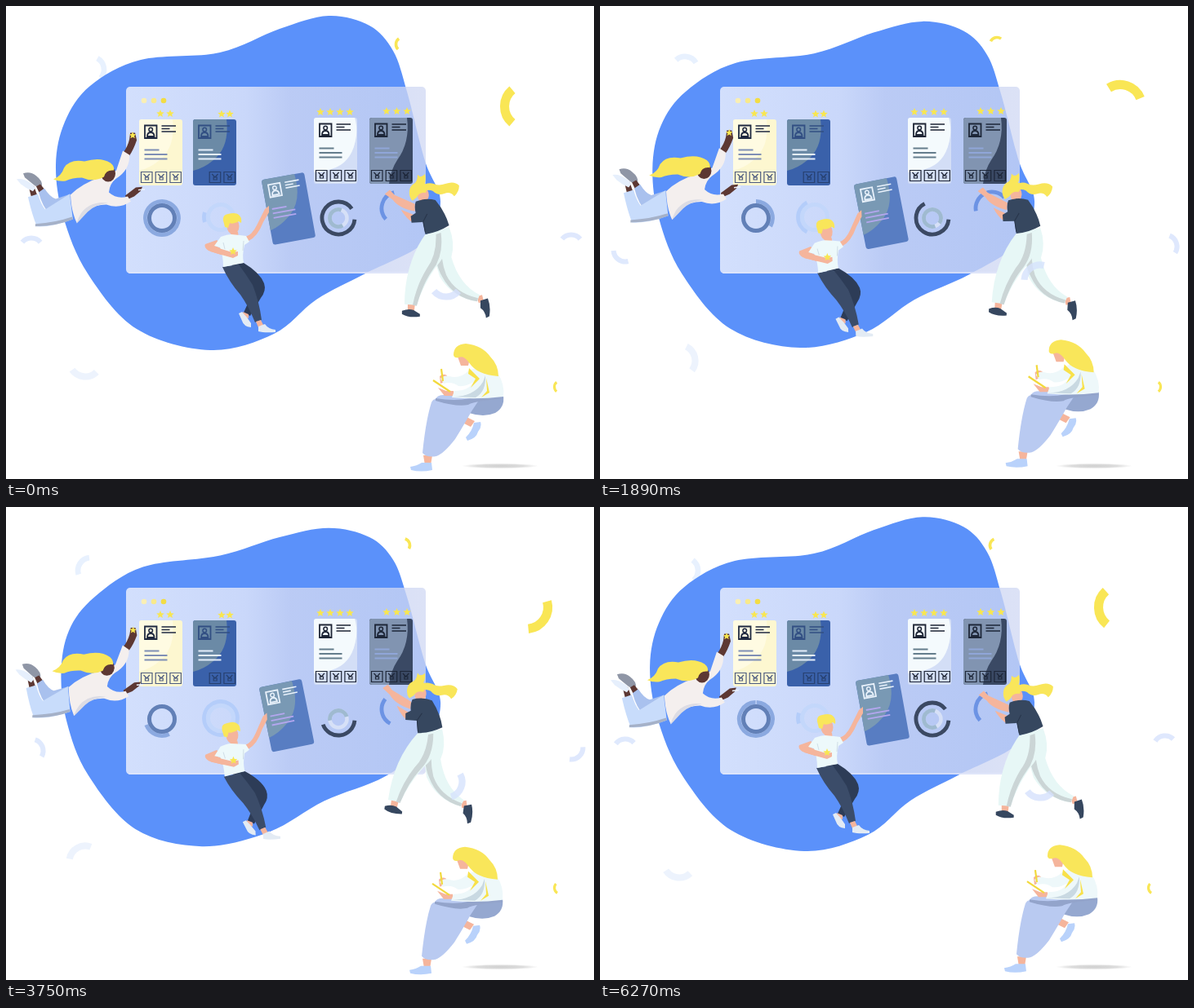
Animation, 720 px wide and 580 px high, one loop 6300 ms. Source, as an HTML page:

```html
<!DOCTYPE html>
<html lang="en">
<head>
<meta charset="utf-8">
<title>Choosing candidates</title>
<style>
html, body { margin: 0; width: 100%; height: 100%; overflow: hidden; background: #fff }
svg { display: block; width: 720px; height: 580px }
</style>
</head>
<body>
<svg id="stage" viewBox="0 0 720 580" fill="none"></svg>
<script>
const LOOP = 6300, TURN = 2 * Math.PI;
const YELLOW = '#f9e65a', SKIN = '#f5b59c', BROWN = '#5d3833', NAVY = '#36475f';
const { sin, cos, exp, hypot } = Math;

const path = (fill, d) => `<path fill="${fill}" d="${d}"/>`;
const line = (color, width, d) => `<path stroke="${color}" stroke-width="${width}" d="${d}"/>`;
const dot = (fill, x, y, r, ry = r) => `<ellipse fill="${fill}" cx="${x}" cy="${y}" rx="${r}" ry="${ry}"/>`;
const ring = (x, y, r, w, color) => `<circle cx="${x}" cy="${y}" r="${r}" stroke="${color}" stroke-width="${w}"/>`;
const group = (id, body) => `<g id="${id}">${body}</g>`;
const arcTag = (id, color, width) => `<path id="${id}" stroke="${color}" stroke-width="${width}"/>`;

// Rises from 0 to 1 until the peak, then falls back to 0.
const tent = (f, peak) => f < peak ? f / peak : (1 - f) / (1 - peak);

function star(x, y, r = 5) {
  let pts = '';
  for (let i = 0; i < 10; i++) {
    const a = i * TURN / 10, q = i % 2 ? r * .45 : r;
    pts += `${x + q * sin(a)},${y - q * cos(a)} `;
  }
  return `<polygon fill="#f8e650" points="${pts}"/>`;
}

const starRow = (x, y, count, step) => Array.from({ length: count }, (_, i) => star(x + i * step, y)).join('');

// Angles run clockwise from twelve o'clock, in degrees.
function arc(x, y, r, mid, span) {
  span = Math.min(span, 359.9);
  const at = deg => {
    const a = deg * TURN / 360;
    return `${(x + r * sin(a)).toFixed(2)} ${(y - r * cos(a)).toFixed(2)}`;
  };
  return `M${at(mid - span / 2)}A${r} ${r} 0 ${span > 180 ? 1 : 0} 1 ${at(mid + span / 2)}`;
}

const SMALL = 'M3 0H41q4 34-16 50-12 10-25 13V3q0-3 3-3z';
const LARGE = 'M3 0H50q3 8 2 22-4 30-25 39-13 5-27 6V3q0-3 3-3z';
const TALL = 'M3 0H46q4 30-12 52-8 12-10 29H3q-3 0-3-3V3q0-3 3-3z';

function card({ x, y, fill, corner, shape = SMALL, ink, text, slots = [], slotInk = ink }) {
  const slot = i => {
    const left = 2.5 + 17.7 * i;
    return line(slotInk, 1.2, `M${left} 64.5h13.5v13h-13.5zM${left + 3} 67l3.7 4 3.7-4M${left + 5} 71h4v3h-4z`);
  };
  return `<g transform="translate(${x} ${y})">
    <rect width="53" height="81" rx="3" fill="${fill}"/>${path(corner, shape)}
    ${line(ink, 1.8, 'M7 7.5h14.5v15.5H7zM10 21q0-5 4.2-5t4.3 5z')}
    ${ring(14.2, 12.5, 2.3, 1.5, ink)}
    ${line(ink, 1.6, 'M27.5 8h17.5M27.5 11.5h10M27.5 15h17.5')}
    ${line(text, 1.8, 'M6.5 37.5h18M6.5 43h28M6.5 48.5h28')}
    ${slots.map(slot).join('')}</g>`;
}

const cards = [
  { x: 163, y: 139, fill: '#fdf7d0', corner: '#fffbe2', ink: '#1f2940', text: '#7f8fb5', slots: [0, 1, 2], slotInk: '#4b5b80' },
  { x: 229, y: 139, fill: '#3a61aa', corner: '#6b8aa6', ink: '#324f83', text: '#e4eefa', slots: [1, 2], slotInk: '#27406f' },
  { x: 377, y: 137, fill: '#d3def6', corner: '#f4fafd', shape: LARGE, ink: '#1e2535', text: '#647d8c', slots: [0, 1, 2] },
  { x: 445, y: 137, fill: '#3a4964', corner: '#8194b1', shape: TALL, ink: '#1d2638', text: '#90a6d8', slots: [0, 1, 2] }
];
const heldCard = card({ x: 0, y: 0, fill: '#587dc2', corner: '#7999b4', ink: '#e8f1fb', text: '#b3a6ee' });

const stars = starRow(189, 132, 2, 12) + starRow(264, 132.5, 2, 10) + starRow(385, 130, 4, 12) + starRow(466, 129, 3, 12.5);

const flyer =
  path('#8f96a6', 'M21 206q9-3 16 3 8 6 7 13-6 2-10-2l-11-9z') +
  path(BROWN, 'M28 223l6-2 4 11-7 3zM37 222l5-3 5 6-6 5z') +
  path('#e6effc', 'M13 213q5-1 10 1 10 4 13 10l-3 4q-9-4-15-9z') +
  path('#a9c1ee', 'M40 229l7-5q7 11 14 13l18-6-2 24-20 4q-12-10-17-30z') +
  path('#c8dcfb', 'M27 235l12-4q4 13 9 19l30-19 4 31q-26 10-44 9-6-14-11-36z') +
  path('#a5b1c8', 'M36 271q28-1 46-9l-1-3q-20 7-45 9z') +
  path(BROWN, 'M143 181q6-8 8-17l1-8 6 0 2 9q-4 12-9 19zM146 233l13-10 8-1-2 5-8 7-9 4z') +
  path('#f4efee', 'M79 232q14-14 38-22 12-4 18-8l8-24 8 5q1 18-16 29-8 6-9 17 10 9 23 5l4 6q-14 10-30 4-14 0-22 7-10 5-14 16-7-14-8-35z') +
  path('#dcdce4', 'M87 267q3-15 16-22 10-5 22-3-16 2-25 11z') +
  dot(BROWN, 125, 206, 9, 10) +
  path(YELLOW, 'M58 213q10-4 13-14 7-11 25-8 20-6 32 2 5 4 4 9-10-1-12 8-13 7-27 1-12 0-20 4-8 1-15-2z') +
  star(155, 159, 4.5) + line('#eef4ff', 1.5, 'M162 226l8-1');

const man =
  path(SKIN, 'M258 287l-14 5q-2 4 4 8l28 9 8-3v-5l-10 1-18-8 8-2zM293 283q8-2 14-14l10-20 5-4v8l-7 12q-7 18-18 23z') +
  path('#2d3c57', 'M276 317l15-2q20 12 25 25 3 9-4 18l-13 22-8-4 9-20q2-10-8-14z') +
  path('#3b4c69', 'M265 320l20-3q9 12 17 25 8 20 11 43l-8 3q-8-20-18-34-14-16-22-34z') +
  path(SKIN, 'M290 375l7 3 0 5-6-2zM306 387l6-2 3 6-6 3zM275 277h9l1 8h-9z') +
  path('#e3ebf4', 'M285 377l4-2q6 6 11 14v5q-9-1-11-8zM309 393q5-2 8-3 4 6 13 7v3q-14 1-21-1z') +
  path('#edf9fb', 'M263 283q8-3 13-3l10 1 8 1 4 7-6 4q-3 12-1 22l-25 5q0-14-4-24l-7-2z') +
  line('#cfdde6', 1, 'M266 290l2 8M291 288l-1 12') +
  path(SKIN, 'M247 293l30 9 7-1v5l-6 3-28-8z') +
  dot(SKIN, 278, 270, 7.5, 10) +
  path(YELLOW, 'M266 263q-1-7 6-8 10-3 14 2 3 3 2 9l-3-2q-8 4-11 2l-2 6-4-1z') +
  star(278, 301, 5);

const presenter =
  path(YELLOW, 'M506 224q8-9 18-6 6 3 14 0 11-4 17 2 0 8-6 13-5-6-12-3-8 3-14-3-7-3-13 2zM499 219q5-3 5-12 4 5 9-1 2 8-1 13z') +
  path(SKIN, 'M464 231l6-5 6 6 25 11v9q-20-4-27-14zM484 250l15 6-2 9q-8-6-13-15zM493 365h9l-1 9h-8zM577 356l7-2 2 8-6 2z') +
  dot(SKIN, 511, 232, 7, 9) +
  path(YELLOW, 'M494 229q0-11 12-13 10 0 10 8l-2 5q-8-1-11 6l-5 4q-4-4-4-10z') +
  path(NAVY, 'M582 361l9-3q4 10 2 22l-4 2q-1-8-7-12zM486 374q8-3 14-1l8 5v3q-14 2-22-3z') +
  path('#e7f7f6', 'M524 281l19-10q8 20 3 37 10 34 35 46l-3 8q-30-4-46-30-8-22-8-51z') +
  path('#cbd5d6', 'M525 284q0 32 10 48 14 26 43 30l1-4q-28-6-39-28-8-20-6-46z') +
  path('#e7f7f6', 'M514 280l26-8q8 20-8 42-18 22-28 53l-15-1q0-50 25-86z') +
  path('#cbd5d6', 'M527 280q1 26-11 42-12 20-17 45l5 1q7-27 19-44 14-18 10-46z') +
  path(NAVY, 'M502 240q12-5 24-2 12 14 17 31-14 9-29 11l-3-15-14 1-1-8 6-4q-2-8 0-14z') +
  line('#273449', 1, 'M511 265l5-10M514 278l-3-14');

const writer =
  path(SKIN, 'M511 551h11l-2 12h-7zM564 504l10 5-5 7-8-4z') +
  path('#b9d2fb', 'M495 565q8-1 14-5l12 0 1 9q-14 3-26 0zM573 511l8-1q2 6-3 12-2 8-13 11l-2-4q8-8 10-18z') +
  path('#95a8d0', 'M548 478l61 0q2 14-10 21-14 6-32 0l-16-8z') +
  path('#b9caf1', 'M526 482q2-5 10-5 28 1 44 5l-10 15q-10 18-20 34-14 18-23 21-12 2-17-4 4-40 11-62 2-4 5-4z') +
  path('#93a4cb', 'M526 481q24 4 42 0 18-2 41-2l0 3q-36 2-43 7-14 3-40-5z') +
  path(SKIN, 'M529 468l10 4 9 0 1 6-12 0zM531 454q4-4 9-1l-1 7-7 3zM553 430q8-4 15 2l-2 9-9 0z') +
  path('#eef8fa', 'M532 457q4-5 11-3 12 4 24-7l16-6 19 9q9 14 7 29-32 4-63 1l3-8q18 0 23-11-8 6-18 5-8-6-18-3z') +
  path('#c9d9e2', 'M547 479q26 0 37-18l3-8q1 20-12 27z') +
  path('#f8e14a', 'M567 444l13 13-11 11 6-11-9-6zM588 456l4 18-10 6 7-8z') +
  path(YELLOW, 'M548 428q0-13 15-14 20 2 30 16 10 10 10 24-14-1-22-5-8-3-15-13-6-8-12-5-5 1-6-3z') +
  line('#f2d93c', 2.2, 'M523 459l21 14M533 445l2 15');

// Loose rings: place, radius, starting angle and whole turns per loop.
const loose = [
  { x: 637, y: 123, r: 26.5, start: 270, turns: 1, color: '#f9e655' },
  { x: 486, y: 47, r: 8.5, start: 275, turns: -6, color: '#f9e655' },
  { x: 679, y: 467, r: 7.5, start: 270, turns: 5, color: '#f9e655' },
  { x: 104, y: 78, r: 16, start: 80, turns: -4, color: '#e8f1fe' },
  { x: 31, y: 299, r: 14.5, start: 0, turns: 2, color: '#dfe9fd' },
  { x: 692, y: 295, r: 14.5, start: 0, turns: 4, color: '#dfe8fd' },
  { x: 97, y: 435, r: 19.5, start: 185, turns: -1, color: '#edf3fd' },
  { x: 539, y: 337, r: 19.5, start: 180, turns: -2, color: '#d6e2fdcc' }
];
const looseTag = (o, i) => arcTag('loose' + i, o.color, o.r * .42);

// Dials on the board; pose gives the middle and the span of the arc.
const dials = [
  { x: 191, y: 260, r: 20.5, color: '#8ba9e0', pose(f) {
    const span = 360 * (1 - tent(f, .45));
    return [f < .45 ? span / 2 : 210 - span / 12, span];
  } },
  { x: 263, y: 259, r: 20.5, color: '#b4cdfa', pose: f => [270, 180 - 180 * cos(TURN * (f - .1))] },
  { x: 407, y: 260, r: 20, color: '#3b4963', pose(f) {
    const span = 320 - 180 * tent(f, .65);
    return [95 + span / 2, span];
  } },
  { x: 407, y: 260, r: 10.5, color: '#9fbad0', pose: f => [310 - 45 * cos(TURN * f), 230 + 100 * sin(TURN * f)] },
  { x: 480, y: 248, r: 20, color: '#6c93e4', pose: f => [287 + 50 * sin(TURN * f), 118 + 32 * sin(TURN * f)] }
];

const outline = [[395, 12], [445, 24], [474, 55], [491, 105], [513, 190], [532, 240], [512, 290], [440, 328], [380, 360],
  [328, 402], [250, 422], [160, 396], [100, 328], [70, 258], [61, 195], [72, 142], [103, 98], [165, 66], [262, 57], [335, 28]];

// Soft local pushes that bend the outline.
const pushes = [
  { x: 410, y: 30, dx: 0, dy: 16, reach: 110 },
  { x: 110, y: 85, dx: 5, dy: 14, reach: 80 },
  { x: 430, y: 335, dx: 28, dy: 3, reach: 60 },
  { x: 270, y: 415, dx: -12, dy: -7, reach: 80 },
  { x: 60, y: 210, dx: 7, dy: 8, reach: 80 }
];

function blobPath(amount) {
  const pts = outline.map(([x, y]) => pushes.reduce((p, q) => {
    const k = amount * exp(-((hypot(x - q.x, y - q.y) / q.reach) ** 2));
    return [p[0] + q.dx * k, p[1] + q.dy * k];
  }, [x, y]));
  const n = pts.length, at = i => pts[(i + n) % n];
  const handle = (i, side) => at(i).map((v, k) => v + side * (at(i + 1)[k] - at(i - 1)[k]) / 6);
  const curve = (_, i) => 'C' + [handle(i, 1), handle(i + 1, -1), at(i + 1)].map(p => p.map(v => v.toFixed(2)).join(' ')).join(' ');
  return `M${pts[0].join(' ')}${pts.map(curve).join('')}z`;
}

const stage = document.getElementById('stage');
stage.innerHTML = `<defs>
  <linearGradient id="glass">
    <stop stop-color="#e6ecfd" stop-opacity=".86"/>
    <stop offset=".4" stop-color="#dae2fa" stop-opacity=".87"/>
    <stop offset=".55" stop-color="#cad4f4" stop-opacity=".86"/>
    <stop offset="1" stop-color="#d0d8f3" stop-opacity=".75"/>
  </linearGradient>
  <radialGradient id="shade"><stop stop-color="#cfcfcf"/><stop offset=".6" stop-color="#dcdcdc"/>
    <stop offset="1" stop-color="#fff"/></radialGradient></defs>
  ${loose.slice(0, -1).map(looseTag).join('')}
  <path id="blob" fill="#5b91fa"/>
  <rect x="147" y="99" width="367" height="229" rx="5" fill="url(#glass)"/>
  ${line('#e4eafc99', 2, 'M150 327h361')}
  ${dot('#f9efb4', 169, 116, 3.3) + dot('#f8e98a', 181, 116, 3.3) + dot('#f2dc45', 193, 116, 3.3)}
  ${stars}${cards.map(card).join('')}
  ${ring(263, 259, 15.5, 5, '#c3d7fb') + ring(407, 260, 10.5, 4.5, '#d6e0f7')}
  ${dials.map((d, i) => arcTag('dial' + i, d.color, 4.8)).join('')}
  ${ring(191, 260, 15.5, 5, '#6280b7')}
  ${group('held', heldCard)}
  ${dot('url(#shade)', 605, 564, 47, 3.2)}
  ${group('flyer', flyer)}${group('man', man)}${group('presenter', presenter)}${group('writer', writer)}
  ${looseTag(loose.at(-1), loose.length - 1)}`;

const set = (id, name, value) => document.getElementById(id).setAttribute(name, value);
const move = (id, value) => set(id, 'transform', value);

function draw() {
  const t = performance.now() % LOOP, f = t / LOOP;
  const swing = delay => (1 - cos((t - delay) / LOOP * TURN)) / 2;
  const wave = sin(f * TURN), p = swing(0), late = swing(450);

  set('blob', 'd', blobPath(tent(f, 2 / 3)));
  loose.forEach((o, i) => set('loose' + i, 'd', arc(o.x, o.y, o.r, o.start + o.turns * 360 * f, 100)));
  dials.forEach((d, i) => set('dial' + i, 'd', arc(d.x, d.y, d.r, ...d.pose(f))));

  move('held', `translate(${345.5 - 2.5 * p} ${248.5 + 8 * p}) rotate(${-10.2 - 1.3 * p}) translate(-26 -40.5)`);
  move('flyer', `translate(${2.5 * wave} ${-9 * late}) rotate(${2.3 * late} 130 210)`);
  move('man', `translate(0 ${11 * p}) rotate(${-3.5 * p} 275 290)`);
  move('presenter', `rotate(${7.7 * late} 530 205)`);
  move('writer', `translate(${1.7 * wave} ${-5 * wave})`);
  requestAnimationFrame(draw);
}
draw();
</script>
</body>
</html>
```
